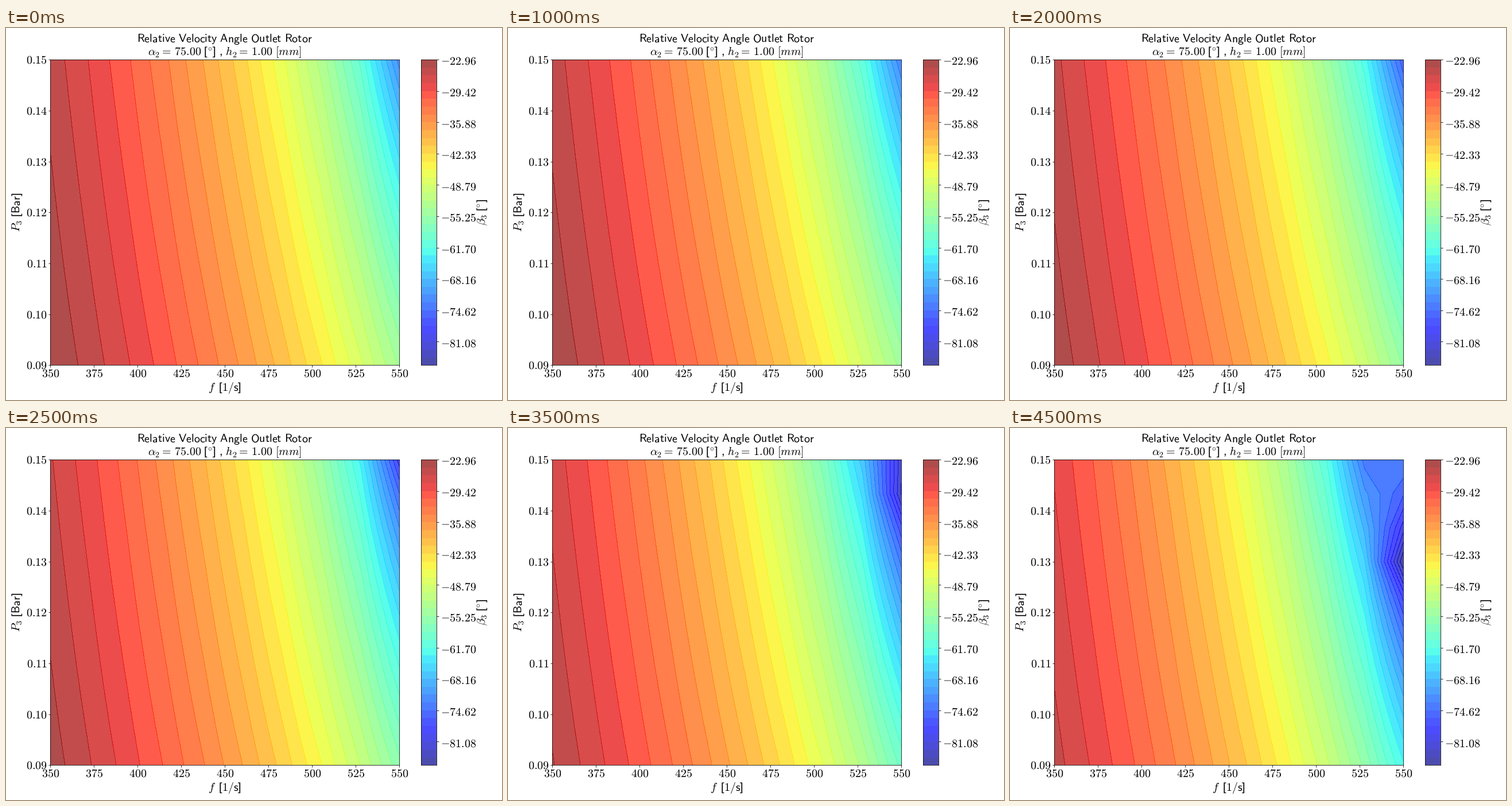
These frames come from a looping animation (864x648 px, 5000 ms). A matplotlib script:

```python
import numpy as np
import matplotlib.pyplot as plt
from matplotlib.animation import FuncAnimation

W, H = 864, 648
FRAMES, INTERVAL = 10, 500

plt.rcParams.update({
    'font.family': 'Liberation Sans',
    'font.size': 20,
    'mathtext.fontset': 'cm',
    'text.hinting': 'none',
})

fig = plt.figure(figsize=(W / 72, H / 72), dpi=72, facecolor='white')


def panel(left, bottom, width, height):
    return fig.add_axes([left / W, bottom / H, width / W, height / H])


def label(x, y, text, ha='center', rotation=0):
    """Text whose baseline is at pixel (x, y), counted from the top left."""
    fig.text(x / W, 1 - y / H, text, ha=ha, va='baseline',
             rotation=rotation, rotation_mode='anchor')


ax = panel(77.2, 60.8, 608, 532)
cax = panel(723.2, 60.8, 26.6, 532)

# Coarse operating grid: rotation rate and outlet pressure
freq, pres = np.meshgrid(np.linspace(350, 550, 10), np.linspace(0.09, 0.15, 10))
levels = -22.962 - 1.614275 * np.arange(39, -1, -1)


def outlet_angle(n):
    """Relative outlet angle in degrees as the tilt goes from 0 to 25 degrees."""
    tilt = np.radians(25 * n / (FRAMES - 1))
    ideal = 1596100 - 2610 * freq + freq ** 2 - 253000 * np.log(pres / 0.09)
    axial = np.sqrt(np.abs(np.cos(tilt) ** 2 * ideal - freq ** 2))
    beta = -np.degrees(np.arctan2(freq, axial))
    return np.clip(beta, levels[0] + 1e-6, levels[-1] - 1e-6)


def fill(axes, x, y, z):
    axes.contourf(x, y, z, levels=levels, cmap='jet', alpha=0.7)


# Colour scale
ends = levels[[0, -1]]
fill(cax, [0, 1], ends, np.column_stack([ends, ends]))
ticks = levels[3::4]
cax.set_xticks([])
cax.yaxis.tick_right()
cax.set_yticks(ticks, labels=[''] * len(ticks))

ax.set_xlim(350, 550)
ax.set_ylim(0.09, 0.15)
x_ticks = np.arange(350, 551, 25)
y_ticks = np.linspace(0.09, 0.15, 7)
ax.set_xticks(x_ticks, labels=[''] * len(x_ticks))
ax.set_yticks(y_ticks, labels=[''] * len(y_ticks))

for i, v in enumerate(x_ticks):
    label(77.5 + 76 * i, 608, f'${v}$')
for i, v in enumerate(y_ticks):
    label(71.5, 594 - 532 * i / 6, f'${v:.2f}$', ha='right')
for v in ticks:
    y = 55.5 + 532 * (levels[-1] - v) / (levels[-1] - levels[0])
    label(757, y + 8.5, f'${v:.2f}$', ha='left')

label(381, 25, r'$\mathsf{Relative\ Velocity\ Angle\ Outlet\ Rotor}$')
label(381, 47, r'$\alpha_2 =\,\mathsf{75.00}\ $[$^{\circ}$]$\ $,$\ h_2 =\,'
               r'\mathsf{1.00}\ [mm]$')
label(380.5, 632, r'$f\,\ $[$\mathsf{1/s}$]')
label(25, 321, r'$P_3\ $[$\mathsf{Bar}$]', rotation=90)
label(835, 320.5, r'$\beta_3\ $[$^{\circ}$]', rotation=90)


def update(n):
    for old in list(ax.collections):
        old.remove()
    fill(ax, freq, pres, outlet_angle(n))
    return ax.collections


anim = FuncAnimation(fig, update, frames=FRAMES, interval=INTERVAL,
                     repeat=True, repeat_delay=0, blit=False)
plt.show()
```
